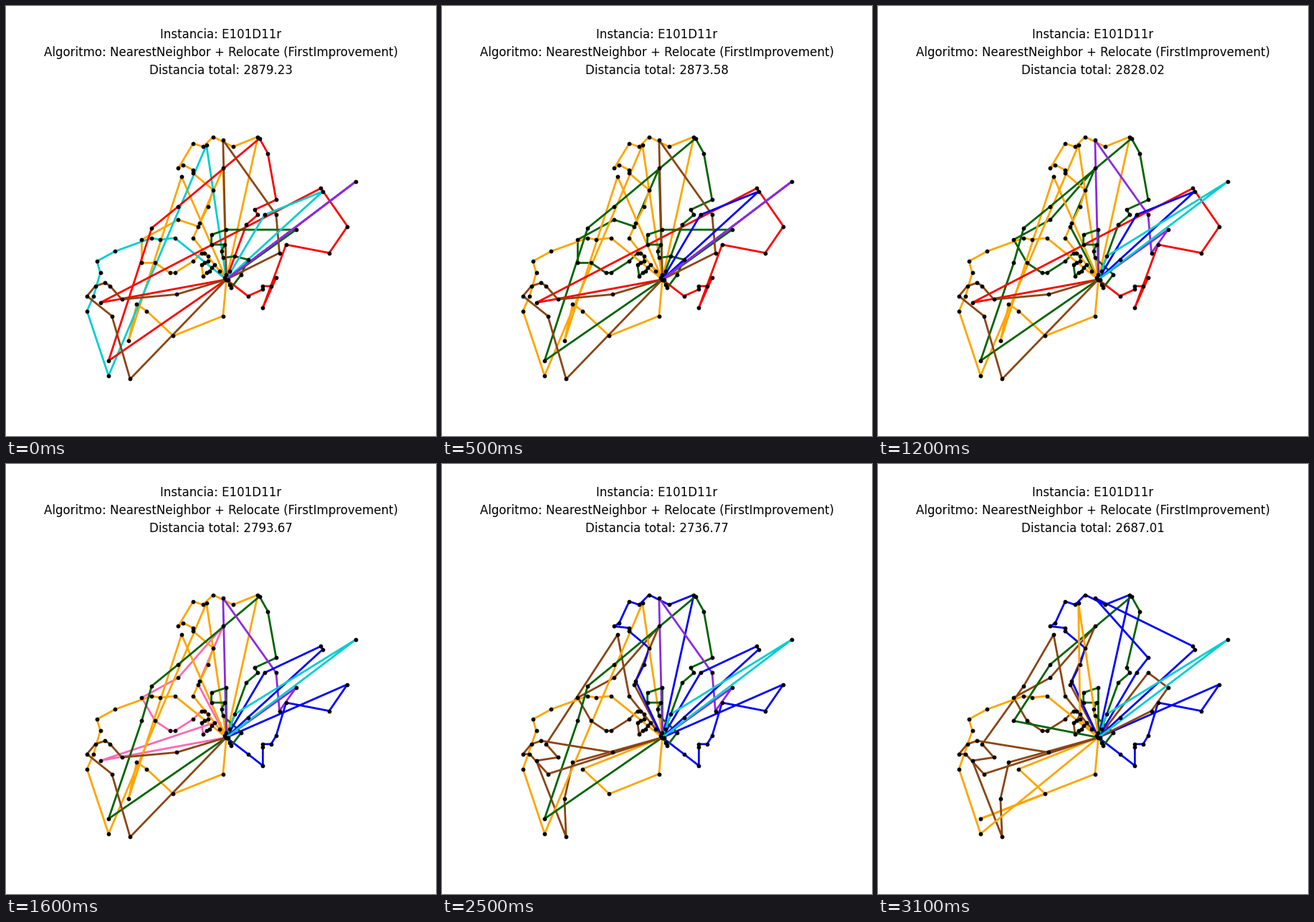
These frames come from a looping animation (600x600 px, 3200 ms). A matplotlib script:

```python
from math import dist

import numpy as np
import matplotlib.pyplot as plt
from matplotlib.animation import FuncAnimation

FRAMES, STEP = 32, 100
UNIT = 2.315                      # pixels per map unit
ORIGIN = np.array([113.0, 182.5])
DEPOT = (307, 381)


def line(a, b, n):
    return list(zip(np.linspace(a[0], b[0], n), np.linspace(a[1], b[1], n)))


def arc(center, radius, start, end, n):
    t = np.radians(np.linspace(start, end, n))
    return list(zip(center[0] + radius * np.cos(t),
                    center[1] + radius * np.sin(t)))


def snap(points):
    """Put pixel positions on the map's whole-unit grid."""
    return ORIGIN + UNIT * np.round((np.array(points) + 0.5 - ORIGIN) / UNIT)


hub = line((305, 379), (309, 381), 3) + [(312, 370), (307, 374)]
slope = line((291, 361), (275, 376), 5)
curl = arc((273, 352), 8, 97, -97, 6)

# Stops of every route in visiting order; the depot closes both ends.
routes = {
    "loop": [*slope, *curl, (261, 356), (235, 372), (228, 372), (207, 358),
             (189, 358), (189, 326), (240, 298), (268, 307), (302, 226)],
    "north": [(351, 182), (316, 196), (288, 182), (275, 196), (261, 191),
              (240, 226), (247, 221), (261, 228), (261, 233), (288, 256),
              (281, 279), (270, 302), (261, 323), (298, 370)],
    "south": [(302, 432), (233, 460), (196, 425), (182, 416), (170, 467),
              (244, 238)],
    "valley": [],
    "west": [(235, 323), (214, 326), (203, 323), (152, 342), (126, 356),
             (131, 372), (122, 404), (113, 425), (143, 515), (279, 194)],
    "arch": [(335, 305), (351, 291), (346, 284), (376, 270), (365, 205),
             (353, 184), (240, 279), (203, 309), (143, 495)],
    "east": [(131, 414), (439, 254), (476, 307), (450, 344), (390, 332),
             (358, 420), (376, 379), (369, 390), (358, 390), (358, 395),
             (337, 404)],
    "near": [(312, 388), (314, 393), (328, 374), (337, 353), (319, 349),
             (302, 351), (300, 342), (305, 332), (286, 332), (286, 319),
             (307, 312), (404, 312)],
    "back": [(238, 402), (161, 409), (145, 390), (138, 386), (124, 390),
             (113, 404), (147, 432), (173, 520)],
    "spur": [],
    "tri": [(302, 187), (376, 291), (381, 344)],
    "pair": [(360, 291), (441, 258)],
    "far": [(488, 245)],
}
colors = dict(loop="orange", north="orange", south="orange",
              valley="blueviolet", west="darkturquoise", arch="red",
              east="red", near="darkgreen", back="saddlebrown",
              spur="orange", tri="saddlebrown", pair="darkturquoise",
              far="blueviolet")
START_TOTAL = 2879.23

# Search rounds: last step, total there, new colours, and the relocated
# stops with their new route (and place, unless the cheapest one is taken).
rounds = [
    (5, 2873.58,
     dict(loop="darkgreen", arch="darkgreen", west="orange", pair="blue"),
     []),
    (12, 2828.02, dict(tri="blueviolet", far="darkturquoise"),
     [((404, 312), "tri", 3), ((319, 349), "far"), ((337, 353), "pair"),
      ((189, 358), "arch"), ((268, 307), "loop")]),
    (16, 2793.67, dict(loop="hotpink", east="blue"),
     [((439, 254), "pair"), ((131, 414), "loop", 0), ((358, 420), "east")]),
    (20, 2755.39, dict(loop="blueviolet"),
     [((161, 409), "valley"), ((131, 414), "valley"), ((182, 416), "valley"),
      ((244, 238), "valley"), ((170, 467), "valley")]),
    (25, 2736.77,
     dict(loop="saddlebrown", valley="saddlebrown", north="blue"),
     [((261, 323), "valley"), ((298, 370), "valley"), ((145, 390), "valley"),
      ((173, 520), "valley"), ((122, 404), "back"), ((247, 221), "north")]),
    (31, 2687.01, dict(tri="saddlebrown"),
     [((376, 270), "pair"), ((302, 187), "pair", 2), ((404, 312), "tri"),
      ((203, 309), "valley"), ((143, 495), "south", 1), (curl[2], "spur"),
      ((279, 194), "spur")]),
]


def cheapest(stop, route):
    tour = [DEPOT, *route, DEPOT]
    costs = [dist(a, stop) + dist(stop, b) - dist(a, b)
             for a, b in zip(tour, tour[1:])]
    return int(np.argmin(costs))


def relocate(stop, name, pos=None):
    for route in routes.values():
        if stop in route:
            route.remove(stop)
            break
    target = routes[name]
    target.insert(cheapest(stop, target) if pos is None else pos, stop)


def state():
    return {n: (snap([DEPOT, *r, DEPOT]), colors[n])
            for n, r in routes.items()}


def search():
    """Run the rounds, spreading each one's moves evenly over its steps."""
    states, begin = [state()], 0
    for end, _, paint, moves in rounds:
        span = end - begin
        for k in range(span):
            for i, move in enumerate(moves):
                if i * span // len(moves) == k:
                    relocate(*move)
            if k == span // 2:
                colors.update(paint)
            states.append(state())
        begin = end
    return states


stops = snap(hub + [p for r in routes.values() for p in r])
states = search()
totals = np.interp(range(FRAMES), [0] + [r[0] for r in rounds],
                   [START_TOTAL] + [r[1] for r in rounds])

plt.rcParams["font.family"] = "DejaVu Sans"
fig = plt.figure(figsize=(6, 6), dpi=100, facecolor="white")
ax = fig.add_axes((0, 0, 1, 1))
ax.set(xlim=(0, 600), ylim=(600, 0))
ax.axis("off")


def label(y, text=""):
    return ax.text(300, y, text, ha="center", va="baseline", fontsize=12)


label(45, "Instancia: E101D11r")
label(70, "Algoritmo: NearestNeighbor + Relocate (FirstImprovement)")
total = label(95)
lines = {n: ax.plot([], [], lw=2, solid_capstyle="butt")[0] for n in routes}
ax.plot(*stops.T, "o", color="black", ms=4.2, mew=0, zorder=5)


def draw(k):
    for name, (path, color) in states[k].items():
        lines[name].set_data(*path.T)
        lines[name].set_color(color)
    total.set_text(f"Distancia total: {totals[k]:.2f}")
    return [*lines.values(), total]


anim = FuncAnimation(fig, draw, frames=FRAMES, interval=STEP, repeat=True)
plt.show()
```
